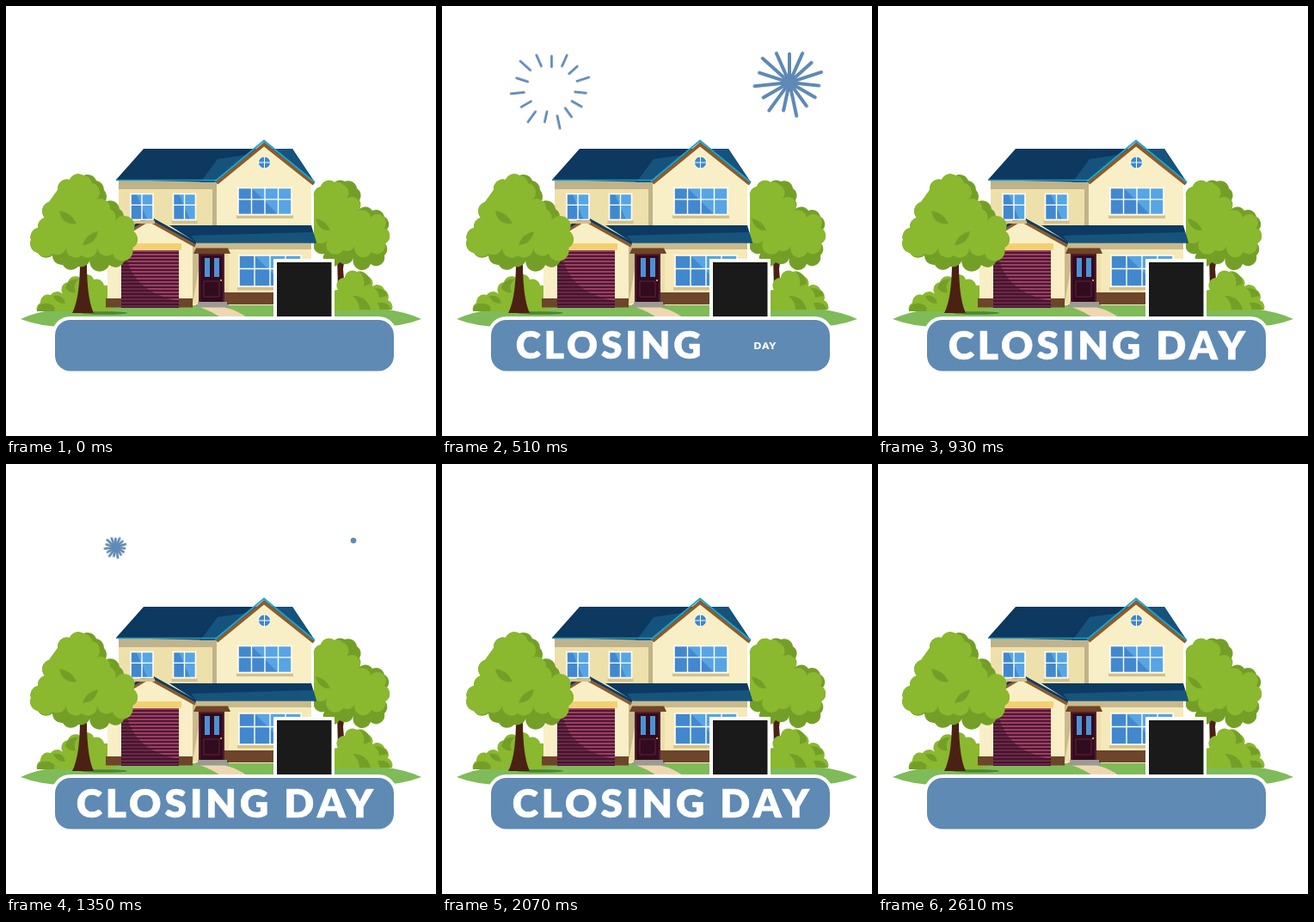
Write an HTML page that moves like this. It is 500 px wide and 500 px high and loops after 2730 ms.

```html
<!DOCTYPE html>
<html lang="en">
<head>
<meta charset="utf-8">
<title>Closing day</title>
<style>
  html, body { margin: 0; width: 100%; height: 100%; overflow: hidden; background: #fff; }
  svg { display: block; width: 100%; height: 100%; }

  .word {
    font: 900 46px Lato, "Open Sans", sans-serif;
    letter-spacing: 4px;
    text-anchor: middle;
    fill: #fff;
    stroke: #fff;
    stroke-width: .7px;
    transform-box: view-box;
  }
  .closing { transform-origin: 193.5px 395px; animation: pop-closing 2730ms infinite; }
  .day { letter-spacing: 5px; transform-origin: 375.5px 395px; animation: pop-day 2730ms infinite; }
  .words { animation: leave 2730ms infinite; }

  @keyframes pop-closing {
    0%, 14.87% { transform: scale(0); animation-timing-function: cubic-bezier(.34, 1.56, .64, 1); }
    26.26%, 100% { transform: scale(1); }
  }
  @keyframes pop-day {
    0%, 18.06% { transform: scale(0); animation-timing-function: cubic-bezier(.34, 1.56, .64, 1); }
    29.45%, 100% { transform: scale(1); }
  }
  @keyframes leave {
    0%, 82.97% { transform: translateY(0); animation-timing-function: ease-in; }
    95.6%, 100% { transform: translateY(-50px); }
  }

  /* Each ray grows from the centre, then its tail catches up with its tip. */
  .burst { stroke: #5e89b4; stroke-width: 4; stroke-linecap: round; }
  .burst line { opacity: 0; animation: 2730ms linear infinite; animation-delay: inherit; }
  .left line { animation-name: burst-left; }
  .right line { animation-name: burst-right; }
  .left { animation-delay: -2650ms; }
  .left.again { animation-delay: -1510ms; }
  .right { animation-delay: -2530ms; }
  .right.again { animation-delay: -1390ms; }

  @keyframes burst-left {
    0% { opacity: 1; stroke-dasharray: 0 2; stroke-dashoffset: 0; }
    4.75% { stroke-dasharray: .26 2; }
    8.5% { stroke-dasharray: .58 2; stroke-dashoffset: 0; }
    10.1% { stroke-dasharray: .6 2; stroke-dashoffset: -.17; }
    14.2% { stroke-dasharray: .37 2; stroke-dashoffset: -.58; }
    15.8% { stroke-dasharray: .32 2; stroke-dashoffset: -.68; }
    17.9% { stroke-dasharray: .07 2; stroke-dashoffset: -.93; }
    19.7% { opacity: 1; stroke-dasharray: 0 2; stroke-dashoffset: -1; }
    19.71%, 100% { opacity: 0; stroke-dasharray: 0 2; stroke-dashoffset: -1; }
  }
  @keyframes burst-right {
    0% { opacity: 1; stroke-dasharray: 0 2; stroke-dashoffset: 0; }
    6.5% { stroke-dasharray: .28 2; }
    11.35% { stroke-dasharray: .58 2; stroke-dashoffset: 0; }
    13.5% { stroke-dasharray: .6 2; stroke-dashoffset: -.17; }
    19.1% { stroke-dasharray: .37 2; stroke-dashoffset: -.58; }
    21.4% { stroke-dasharray: .32 2; stroke-dashoffset: -.68; }
    24.3% { stroke-dasharray: .07 2; stroke-dashoffset: -.93; }
    26.6% { opacity: 1; stroke-dasharray: 0 2; stroke-dashoffset: -1; }
    26.61%, 100% { opacity: 0; stroke-dasharray: 0 2; stroke-dashoffset: -1; }
  }
</style>
</head>
<body>
<svg viewBox="0 0 500 500">
  <defs>
    <clipPath id="banner"><rect x="57" y="365" width="394" height="59.5" rx="18"/></clipPath>
    <pattern id="slats" width="68" height="4" y="284" patternUnits="userSpaceOnUse">
      <rect width="68" height="4" fill="#4d1833"/>
      <rect width="68" height="2" fill="#9c3f62"/>
    </pattern>
  </defs>

  <path d="M17 364Q50 348 130 348H370Q450 348 483 364 460 373 430 373H70Q40 373 17 364z" fill="#7fbb58"/>

  <!-- right tree and bushes -->
  <path d="M385 290h9l-2 16 2 24h-8z" fill="#4a2112"/>
  <g data-cloud="358,222 366,210 382,205 394,204 408,212 411,226 411,236 426,238 440,245 443,260 441,276 440,290 424,300 404,293 388,298 370,288 358,282" data-r="10" fill="#749f27"></g>
  <g data-cloud="358,222 366,210 382,205 392,208 396,224 410,238 424,246 440,258 441,276 425,286 406,278 392,284 374,272 358,272" data-r="10" fill="#8ab82f"></g>
  <path d="M360 247q12 2 17 14-13 1-17-14z" fill="#749f27"/>
  <g data-cloud="386,354 386,330 394,316 408,309 420,314 426,326 440,330 444,342 449,353" data-r="9" fill="#8ab82f"></g>
  <path d="M411 309q13 2 13 14l-8 3q2-11-5-17zM428 328q14 0 16 9l-10 2q-1-8-6-11zM403 337q17 0 21 16h-13q0-9-8-16zM432 345q12-2 16 8h-13z" fill="#749f27"/>
  <g data-cloud="36,355 40,345 52,336 66,335 72,321 86,316 102,318 114,325 118,355" data-r="9" fill="#8ab82f"></g>
  <path d="M36 355q0-11 14-9 9 3 6 9zM69 328q3-12 15-10-7 7-3 15-6 2-12-5zM55 337q12-2 14 9-11 0-14-9z" fill="#749f27"/>

  <!-- upper floor -->
  <path d="M131 202h114v54H131z" fill="#eee0ab"/>
  <path d="M131 203h114v10H131zM240 205h5v51h-5z" fill="#c0b28a"/>
  <path d="M160 166H333L359 205H245L128 202z" fill="#0d385f"/>
  <path d="M246 178L288 172 300 158 310 166H333L359 205H226z" fill="#16537c"/>
  <path d="M128 202.500H244" stroke="#1d9cc4" stroke-width="1.500"/>
  <path d="M245 206L300 161 355 205V256H245z" fill="#f9efc6"/>
  <path d="M245 206L300 161 358 207" fill="none" stroke="#8c5b2a" stroke-width="4"/>
  <path d="M243 204L300 156.500 359 205" fill="none" stroke="#1fa3cc" stroke-width="2"/>
  <circle cx="300.500" cy="182" r="7" fill="#3d87cf" stroke="#fffbe6"/>
  <path d="M300.500 175v14M293.500 182h14" stroke="#fffbe6"/>

  <!-- lower floor -->
  <path d="M118 256H355V348H118z" fill="#f5e9ba"/>
  <path d="M217 276H259V346H217z" fill="#eee0ab"/>
  <path d="M217 276H355V283H228L217 346z" fill="#c9ba8e"/>
  <path d="M116 340H217V350.500H116zM254 333H355V347H254z" fill="#6c452b"/>
  <path d="M190 255H355L361 275.500H222z" fill="#0c3a62"/>
  <path d="M215 267L357 263 361 275.500H222z" fill="#17547c"/>
  <path d="M118 276L166 247 217 277V340H118z" fill="#f9efc6"/>
  <path d="M140 264.500L166 249 220 279" fill="none" stroke="#8c5b2a" stroke-width="3.500"/>
  <path d="M140 261.500L166 245.500 221 276" fill="none" stroke="#0d385f" stroke-width="3"/>
  <path d="M128 276H204V283.500H128z" fill="#f4d06f"/>
  <path d="M134 284H201V351H134z" fill="url(#slats)"/>
  <path d="M134 284h5q5 48 62 59v8H134z" fill="#3d122b" opacity=".5"/>

  <path d="M221 281.500H258L261 288H218z" fill="#704425"/>
  <path d="M224 288H254V345H224z" fill="#561b31"/>
  <path d="M226 290H252V344H226z" fill="#300c1e"/>
  <path d="M231 293h6v22h-6zM242 293h6v22h-6z" fill="#4e91d4"/>
  <path d="M230 320h18v18h-18z" fill="none" stroke="#65213c"/>
  <circle cx="250" cy="319" r="1" fill="#f4d06f"/>
  <path d="M223 344H257V347H259V350.500H221V347H223z" fill="#9b9a94"/>
  <path d="M226 350.500H254Q270 354 281 363H250Q242 356 226 350.500z" fill="#efd6b2"/>

  <g id="windows"></g>

  <!-- left tree -->
  <ellipse cx="114" cy="357" rx="27" ry="1.800" fill="#4f833a"/>
  <path d="M86 285H94Q93 339 102 357H77Q87 338 86 285z" fill="#4a2112"/>
  <g data-cloud="60,214 74,202 90,197 105,203 114,214 115,228 132,236 136,250 148,262 147,281 138,295 120,301 98,293 84,303 66,301 54,290 37,287 29,272 37,258 45,246 50,228" data-r="11" fill="#749f27"></g>
  <g data-cloud="60,214 74,202 90,197 100,206 104,226 121,236 127,250 148,262 147,281 124,288 106,281 88,290 70,281 54,288 37,287 29,272 37,258 45,246 50,228" data-r="11" fill="#8ab82f"></g>
  <path d="M62 238q14 2 20 15-17 2-20-15zM107 262q-3 15-18 16 4-13 18-16z" fill="#749f27"/>

  <!-- sign and banner -->
  <rect x="311" y="294" width="71" height="71" fill="#fff"/>
  <rect x="315" y="298" width="63.500" height="63" fill="#1a1a1a"/>
  <rect x="55" y="363" width="398" height="63.500" rx="20" fill="#fff" stroke="#fff" stroke-width="4"/>
  <rect x="57" y="365" width="394" height="59.500" rx="18" fill="#5f8ab4"/>

  <g clip-path="url(#banner)">
    <g class="words">
      <text class="word closing" x="195.500" y="411">CLOSING</text>
      <text class="word day" x="377.500" y="411">DAY</text>
    </g>
  </g>

  <g id="bursts"></g>
</svg>
<script>
  const rayLengths = [57, 64, 59, 67, 59, 59, 58, 68, 57, 69, 60, 70, 63, 72, 64];

  const rays = rayLengths.map((length, i) =>
    `<line y2="${-length}" pathLength="1" transform="rotate(${i * 24})"/>`).join("");

  const burst = (name, x, y, scale) =>
    `<g class="burst ${name}" transform="translate(${x} ${y}) scale(${scale})">${rays}</g>`;

  document.getElementById("bursts").innerHTML = ["", " again"].map(run =>
    burst("left" + run, 127.5, 97, .68) + burst("right" + run, 404, 89, 1)).join("");

  // Scalloped outline: an arc bulges outwards between neighbouring points.
  for (const cloud of document.querySelectorAll("[data-cloud]")) {
    const { cloud: list, r } = cloud.dataset;
    const [first, ...rest] = list.split(" ");
    const arcs = rest.map(point => `A${r} ${r} 0 0 1 ${point}`);
    cloud.innerHTML = `<path d="M${first}${arcs.join("")}z"/>`;
  }

  function pane(x, y, w, h, columns) {
    let bars = `M${x} ${y + h * .43}h${w}`;
    for (let i = 1; i < columns; i++) bars += `M${x + i * w / columns} ${y}v${h}`;
    return `<rect x="${x - 2}" y="${y + h + 1}" width="${w + 4}" height="3.5" fill="#d3c08d"/>
      <rect x="${x}" y="${y}" width="${w}" height="${h}" fill="#4288cf"/>
      <path d="M${x + w * .25} ${y}H${x + w}V${y + h}H${x + w * .75}z" fill="#57a5e4"/>
      <path d="${bars}" stroke="#fff" stroke-width="1.4"/>
      <rect x="${x}" y="${y}" width="${w}" height="${h}" fill="none" stroke="#fffdf0" stroke-width="1.6"/>`;
  }

  document.getElementById("windows").innerHTML =
    pane(145, 218.5, 26, 30, 2) + pane(194.5, 218.5, 26, 30, 2) +
    pane(270, 211.5, 62, 31, 4) + pane(271, 290, 72, 36, 4);
</script>
</body>
</html>
```
